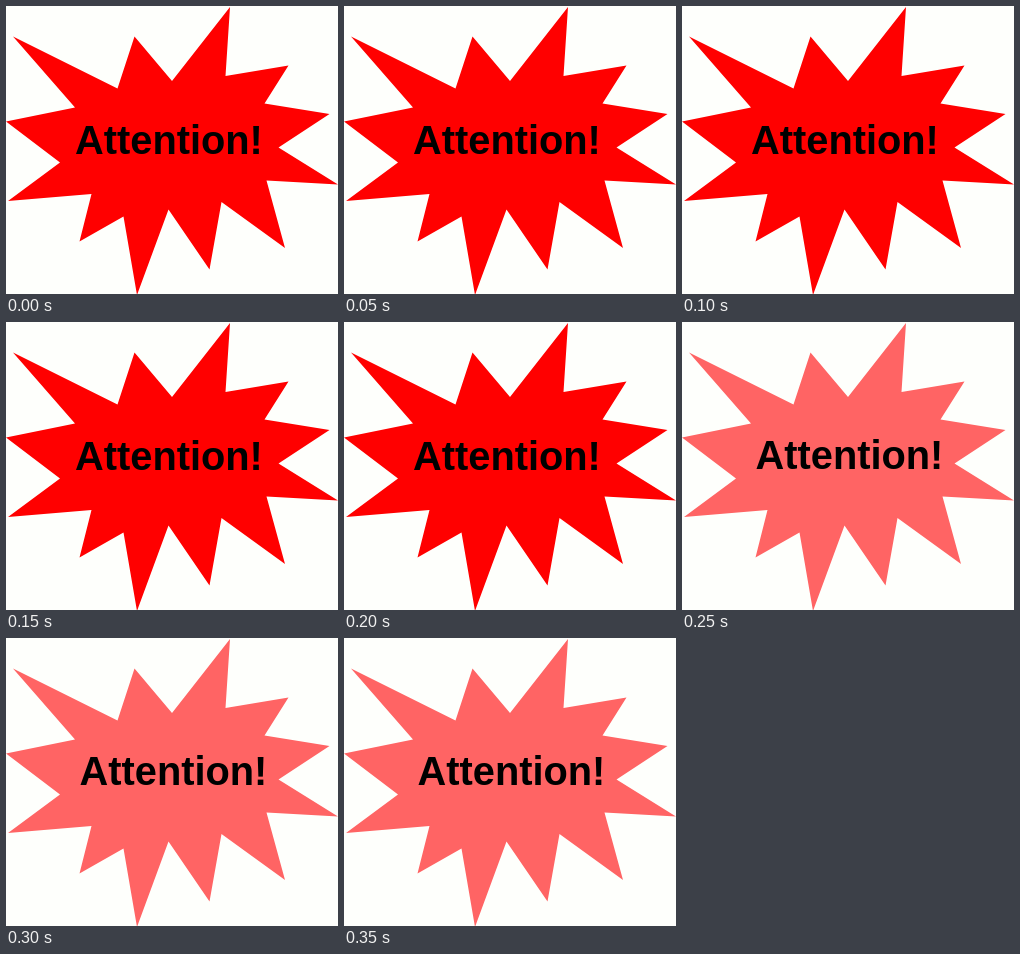
These frames come from a looping animation (332x288 px, 450 ms). An HTML page:

```html
<!DOCTYPE html>
<html lang="en">
<head>
<meta charset="utf-8">
<title>Attention!</title>
<style>
  html, body { margin: 0; width: 100%; height: 100%; overflow: hidden; background: #fefffc; }
  svg { display: block; width: 100%; height: 100%; }
  text { font: bold 39.8px "Liberation Sans", Arial, sans-serif; }
</style>
</head>
<body>
<svg viewBox="0 0 332 288">
  <polygon id="burst" fill="#f00" points="7,30.5 111.5,82.5 128.5,30.5 166,75 224,1 219.5,70 282.5,59.5 258.5,97.5
    323.5,108 272.5,141.5 332,178.5 260.5,174.5 279,242 215.5,196 203.5,263.5 162.5,203.5
    131,289 117.5,210.5 73.5,235.5 85.5,188 2,195 54,156.5 0,115.5 69,101.5"/>
  <text id="label" x="69" y="147.5">Attention!</text>
</svg>
<script>
const LOOP = 450, SWITCH = 250;
const bright = { fill: '#ff0000', x: 69, y: 147.5 };
const pale = { fill: '#ff6464', x: 73.5, y: 147 };
const burst = document.getElementById('burst');
const label = document.getElementById('label');

function draw(ms) {
  const look = ms % LOOP < SWITCH ? bright : pale;
  burst.setAttribute('fill', look.fill);
  label.setAttribute('x', look.x);
  label.setAttribute('y', look.y);
}

const start = performance.now();
function tick() {
  draw(performance.now() - start);
  requestAnimationFrame(tick);
}
tick();
</script>
</body>
</html>
```
